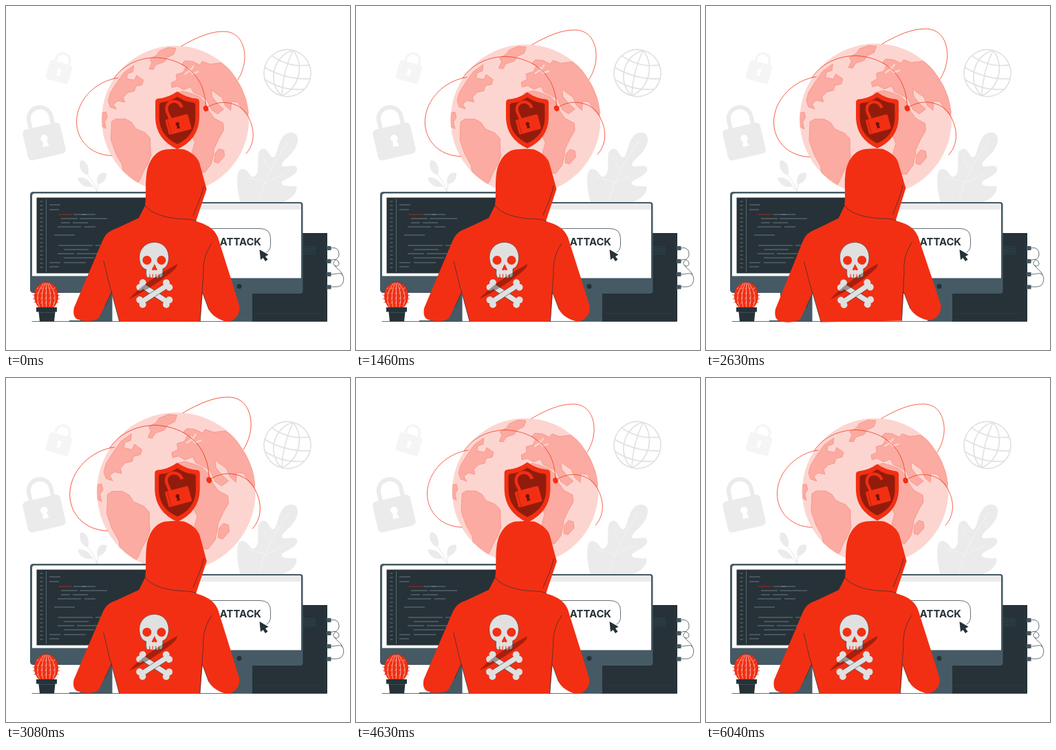
These frames come from a looping animation (500x500 px, 6.08 s). An HTML page:

```html
<!DOCTYPE html>
<html lang="en">
<head>
<meta charset="utf-8">
<title>Cyber attack</title>
<style>
html, body { margin: 0; width: 100%; height: 100%; overflow: hidden; background: #fff; }
svg { display: block; width: 100vw; height: 100vh; }
.line { fill: none; stroke-linecap: round; stroke-linejoin: round; }
.thin { stroke: #263238; stroke-width: .7; }
text { font: 700 14.8px Inter, "Open Sans", sans-serif; fill: #263238; }
</style>
</head>
<body>
<svg viewBox="0 0 500 500">
  <defs>
    <clipPath id="disc"><circle cx="246" cy="164.7" r="106.2"/></clipPath>
    <path id="keyhole" d="M0-6a4.5 4.5 0 0 1 2.4 8.3L4 9H-4L-2.4 2.3A4.5 4.5 0 0 1 0-6z"/>
    <path id="plate" d="M249 125.500Q262 134.500 276 135.500Q280 136 280 140V163Q279 193 249 207Q219 193 218 163V140Q218 136 222 135.500Q236 134.500 249 125.500z"/>
    <g id="bone">
      <path d="M-21 0H21" stroke="#e0e0e0" stroke-width="8"/>
      <g fill="#e0e0e0"><circle cx="-23" cy="-4" r="5"/><circle cx="-23" cy="4" r="5"/><circle cx="23" cy="-4" r="5"/><circle cx="23" cy="4" r="5"/></g>
      <path class="line" d="M-18-4H18M-18 4H18" stroke="#263238" stroke-width=".5"/>
    </g>
  </defs>

  <!-- pale backdrop -->
  <g transform="translate(55.5 197) rotate(-13)">
    <path class="line" d="M-15-22V-34A16.500 16.500 0 0 1 18-34V-22" stroke="#ebebeb" stroke-width="6"/>
    <rect x="-28" y="-23" width="56" height="46" rx="6" fill="#ebebeb"/>
    <use href="#keyhole" fill="#fff" transform="translate(1 -3) scale(1.15)"/>
  </g>
  <g transform="translate(77 96) rotate(15)">
    <path class="line" d="M-9-13V-18A10 10 0 0 1 11-18V-13" stroke="#f5f5f5" stroke-width="3.500"/>
    <rect x="-17" y="-14" width="34" height="28" rx="4" fill="#f5f5f5"/>
    <use href="#keyhole" fill="#fff" transform="translate(0 -1) scale(.7)"/>
  </g>
  <g class="line" stroke="#e0e0e0" stroke-width="1.600" transform="translate(409 97.500) rotate(14)">
    <circle r="34"/>
    <path d="M0-34Q-7 0 0 34M0-34C-26-20-26 20 0 34M0-34C22-18 22 18 0 34M-34 0Q0 10 34 0M-28-19Q0-8 28-19M-29 17Q0 27 29 17"/>
  </g>
  <g fill="#ebebeb">
    <path d="M341 286C336 270 334 246 339 239C344 233 352 240 356 247C360 251 366 245 366 237C367 225 364 211 372 208C381 205 382 219 388 220C396 220 394 186 413 184C423 183 427 191 422 203C417 216 404 222 401 230C401 238 417 228 423 235C426 244 409 250 402 255C396 262 411 262 422 262C425 271 413 283 398 286z"/>
    <path d="M108 225C115 222 123 234 119 246C110 244 105 233 108 225zM133 259C130 248 137 240 146 243C147 252 141 258 133 259zM104 250C112 247 122 253 126 262C116 265 107 260 104 250z"/>
  </g>
  <path class="line" d="M367 285Q379 237 411 197M375 255L349 249M383 237L373 220M374 258L405 244" stroke="#f5f5f5" stroke-width=".8"/>
  <path class="line" d="M119 246Q129 257 133 271M134 259L132 270M125 261L132 270" stroke="#e0e0e0" stroke-width=".8"/>

  <g id="world">
    <circle cx="246" cy="164.700" r="106.200" fill="#fdd5d0"/>
    <g clip-path="url(#disc)" fill="#fbaba1" stroke="#f58478" stroke-width=".6">
      <path d="M208 92L212 83L209 78L219 72L223 66L236 61L247 62L244 71L235 75L230 82L218 86L214 93z"/>
      <path d="M186 87L185 96L177 99L176 106L187 108L190 101L200 108L198 115L189 117L187 124L178 126L171 133L173 140L163 138L157 143L161 150L152 147L149 138L152 127L162 111L172 97z"/>
      <path d="M138 156L146 154L148 162L144 168L146 178L139 174z"/>
      <path d="M154 168L160 164L174 164L183 169L189 178L203 184L210 192L210 206L211 216L206 230L200 240L195 252L188 262L182 263L171 246L169 230L160 214L153 194z"/>
      <path d="M241 119L240 112L248 108L247 100L257 97L261 89L255 85L260 80L271 81L281 86L285 81L296 85L312 83L324 92L340 117L353 148L350 159L342 150L336 140L327 139L326 152L318 145L313 133L304 127L298 122L299 132L307 142L316 150L307 157L298 151L291 136L281 130L272 126L268 118L258 122L249 117z"/>
      <path d="M245 127L257 124L268 127L281 132L289 140L295 153L302 163L315 170L316 180L309 192L302 207L301 216L298 229L289 241L279 241L274 228L270 212L274 198L268 184L258 178L246 180L238 170L233 154L236 139z"/>
      <path d="M302 226L303 214L309 207L316 209L317 218L308 228z"/>
    </g>
    <path class="line" d="M260 99L268 94L272 88M266 91L271 99L279 96" stroke="#fdd5d0" stroke-width="2.200"/>
    <path class="line" d="M154 217C122 216 103.500 193 103.500 168C104 136 132 109 163 105M157 106C171 85 195 75.500 219 75.500C259 78 290 102 290 149M255 59C277 46 297 38 314 38C337 37 347 56 346 78C345 90 341 100 336 108M290 149C307 136 332 138 346 153C361 173 363 198 348 214" stroke="#f22f13" stroke-width=".75"/>
    <ellipse cx="290" cy="149" rx="3.600" ry="4.200" fill="#f22f13" transform="rotate(-20 290 149)"/>
  </g>

  <g id="shield">
    <use href="#plate" fill="#f22f13"/>
    <use href="#plate" fill="#921c0c" transform="translate(249 166) scale(.82) translate(-249 -166)"/>
    <path class="line" d="M239 164L234.500 154C230 138 251 134 255.500 148" stroke="#f22f13" stroke-width="4.200" style="stroke-linecap:butt"/>
    <g transform="translate(250.500 172) rotate(-15)">
      <rect x="-16.500" y="-11" width="33" height="22" rx="2" fill="#f22f13"/>
      <path class="line" d="M-13-10V10" stroke="#921c0c" stroke-width=".5"/>
      <use href="#keyhole" fill="#6a1409" transform="translate(-1 0) scale(.6)"/>
    </g>
  </g>

  <!-- tower -->
  <rect x="357" y="330" width="110" height="128.500" fill="#263238"/>
  <path class="line" d="M463 333V457M361 447H460" stroke="#2f3d44" stroke-width=".7"/>
  <g id="grille" fill="#37505c"></g>
  <path class="line thin" d="M472 352C480 350 484 354 484 361C484 367 478 368 476 373C475 379 484 380 484 374C483 367 473 367 472 371M478 377C481 383 487 384 489 391M472 390C478 390 484 388 487 389C492 392 492 402 487 406C483 409 477 408 472 408"/>
  <path d="M466 349h6.500v6h-6.500zM466 368h6.500v6h-6.500zM466 387h6.500v6h-6.500zM466 405.500h6.500v6h-6.500z" fill="#455a64"/>

  <!-- right monitor -->
  <rect x="322" y="416" width="36" height="42" fill="#455a64"/>
  <rect x="215" y="285" width="216.500" height="133" rx="4" fill="#455a64"/>
  <path d="M218 287H426.500Q429 287 429 290V395.500H218z" fill="#fff"/>
  <path d="M218 287H426.500Q429 287 429 290V296H218z" fill="#ebebeb"/>
  <circle cx="339" cy="407.500" r="3.500" fill="#263238"/>
  <path class="line thin" d="M290 323.500H369Q384.500 323.500 384.500 338V348Q384 355 379 358"/>
  <text x="371" y="347.500" text-anchor="end">ATTACK</text>
  <path d="M368.500 354L370 369L373.500 366L377 371L380.500 368.500L377 364L381.500 361.500z" fill="#263238"/>

  <!-- left monitor -->
  <path d="M108 416H154.500V458.500H92V457H108z" fill="#455a64"/>
  <rect x="35" y="270" width="190" height="147" rx="4.500" fill="#455a64"/>
  <path d="M38 392.500V276Q38 272.500 41.500 272.500H222V392.500z" fill="#fff"/>
  <rect x="44.500" y="278.500" width="178" height="110" fill="#263238"/>
  <path class="line" d="M58.500 281V386" stroke="#78909c" stroke-width=".6"/>
  <g id="code" stroke-width=".75"></g>

  <!-- cactus -->
  <ellipse cx="58.500" cy="422" rx="17.500" ry="20.500" fill="#f22f13"/>
  <g id="spikes" class="line" stroke="#b5230f" stroke-width=".7"></g>
  <g id="ribs" class="line" stroke="#ffd6d0" stroke-width=".7"></g>
  <path d="M44 438H74V444.500H71.500L70 458.500H49L47.500 444.500H44z" fill="#263238"/>
  <path class="line" d="M48 445.500H71" stroke="#455a64" stroke-width=".7"/>

  <path class="line thin" d="M38 458.500H466"/>

  <g id="hacker">
    <path d="M202 290C204 275 202 259 204 245C206 228 215 211 232 208.500C243 207.500 252 207.500 259 208.500C268 212 278 219 281 228L291.500 266L276 313C290 317 302 322 308 336L328 399L339.500 436C341 448 333 458 321 458.500C309 456 299 449 295 441L286 417L282.500 458.500H165L153.500 416L136 452C132 460 110 459 103 455C98 452 98 445 99 439L140 342C145 331 149 327.500 160 323.500L193 308z" fill="#f22f13"/>
    <path class="line thin" d="M202 290C211 302 230 307 249 309C261 310 270 309 277 313M287 262C284 278 276 293 272 304M142 371C147 390 149 402 153.500 416L165 458.500M299 345C291 357 286 370 287 390L285 417L282.500 458.500M153.500 416L144 437M286 417L295 441"/>
    <path d="M215 343.500C228 343 237 353 236.500 367C236 375 233 380 228 382L228 392Q226 396 223 394L221 396L217 394.500L214 396L210 394.500L206 395Q203 393 204 383C197 381 194 374 194 365C194 353 203 344 215 343.500z" fill="#e0e0e0" stroke="#263238" stroke-width=".5"/>
    <g fill="#f22f13">
      <circle cx="205" cy="369.500" r="6.500"/><circle cx="226" cy="369.500" r="6.500"/>
      <path d="M216 375L220 383Q218 385.500 216 383Q214 385.500 212 383z"/>
    </g>
    <path class="line" d="M209 390V395M213.500 390V396M218 390V396M222.500 390V395" stroke="#f22f13" stroke-width="1.100"/>
    <use href="#bone" transform="translate(216 418) rotate(33)"/>
    <use href="#bone" transform="translate(216 418) rotate(-33)"/>
    <path d="M179 426Q200 402 249 375Q250 380 238 389Q212 410 179 426z" fill="#260500" opacity=".36"/>
  </g>
</svg>
<script>
const $ = id => document.getElementById(id);

// code rows: x, y, width
const rows = [[63,289,16],[63,296,14],[98,303,18],[110,303,20],[80,309,24],[107,309,40],[80,315,13],[97,315,22],
  [75,321,34],[114,321,16],[70,333,30],[76,348,50],[130,348,30],[84,354,36],[75,360,24],[103,360,30],
  [84,366,44],[63,373,16],[84,373,32],[63,379,14]];
const dash = (x, y, w, color) => `<path d="M${x} ${y}h${w}" stroke="${color}"/>`;
let code = dash(76, 303, 20, '#c6281a');
for (const [x, y, w] of rows) code += dash(x, y, w, '#80929b');
for (let i = 0; i < 17; i++) code += dash(49.5, 284 + i * 6, 4, '#80929b');
$('code').innerHTML = code;

let dots = '';
for (let i = 0; i < 30; i++)
  dots += `<circle cx="${433 + i % 6 * 3 + (i / 6 & 1) * 1.5}" cy="${350 + (i / 6 | 0) * 2.7}" r=".8"/>`;
$('grille').innerHTML = dots;

let ribs = '';
for (let i = -2; i <= 2; i++) {
  ribs += `<path d="M${58.5 + i * 2} 403Q${58.5 + i * 9} 421 ${58.5 + i * 5} 437"/>`;
  for (let j = 0; j < 4; j++) ribs += `<path d="M${57 + i * 6} ${411 + j * 7}l2 -1.5"/>`;
}
$('ribs').innerHTML = ribs;

let spikes = '';
for (let i = 0; i < 17; i++) {
  const a = (155 + i * 14.4) * Math.PI / 180, c = Math.cos(a), s = Math.sin(a);
  spikes += `<path d="M${58.5 + 17 * c} ${422 + 20 * s}l${2.5 * c} ${2.5 * s - .6}"/>`;
}
$('spikes').innerHTML = spikes;

const LOOP = 6080, LEAD = 45;

// linear interpolation through [position, value] stops
function track(p, stops) {
  const i = stops.findIndex(s => s[0] > p);
  const [a, u] = stops[i - 1], [b, v] = stops[i];
  return u + (v - u) * (p - a) / (b - a);
}
const beat = [[0, 1], [.1, 1.1], [.3, 1], [.4, 1], [.5, 1.1], [.6, 1], [1, 1]];
const sway = [[0, 0], [.25, 1], [.75, -1], [1, 0]];

const scale = (id, x, y, s) =>
  $(id).setAttribute('transform', `translate(${x} ${y}) scale(${s}) translate(${-x} ${-y})`);

function draw(now) {
  const t = (now + LEAD) % LOOP, slow = t / LOOP, fast = slow * 4 % 1;
  scale('world', 229, 156, track(slow, beat));
  scale('shield', 249, 166, track(fast, beat));
  $('hacker').setAttribute('transform', `rotate(${track(fast, sway)} 219 334)`);
}
const start = performance.now();
function tick() {
  draw(performance.now() - start);
  requestAnimationFrame(tick);
}
tick();
</script>
</body>
</html>
```
